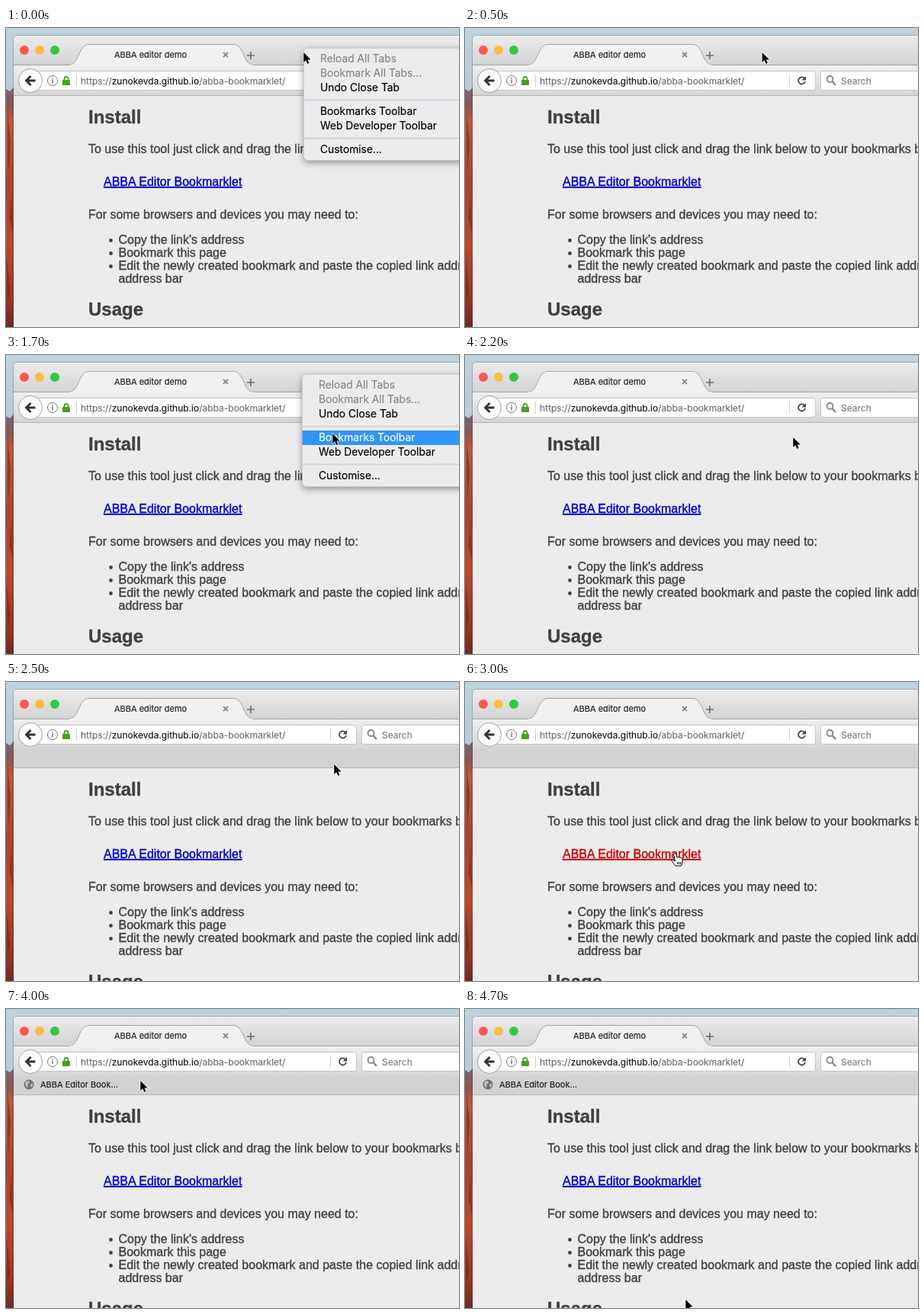
Write an HTML page that moves like this. It is 594 px wide and 392 px high and loops after 4800 ms.

```html
<!DOCTYPE html>
<html lang="en">
<head>
<meta charset="utf-8">
<title>Bookmarklet install demo</title>
<style>
  html, body { margin: 0; width: 100%; height: 100%; overflow: hidden; }
  svg { display: block; font-family: Inter, Roboto, sans-serif; }
  text { white-space: pre; fill: currentColor; stroke: currentColor; stroke-width: .15; }
  #page, #ghost { font: 16px "Liberation Sans", Arial, sans-serif; color: #404040; }
  #page text { stroke-width: .35; }
  #page .head { font-size: 24px; font-weight: bold; }
  #ghost { color: #f00; opacity: .62; }
  .link { text-decoration: underline; }
  #menu { font-size: 13.8px; filter: drop-shadow(0 3px 4px rgba(0, 0, 0, .38)); }
  .line { fill: none; stroke-width: 1; }
</style>
</head>
<body>
<svg width="594" height="392" viewBox="0 0 594 392">
  <defs>
    <linearGradient id="sky" x2="0" y2="1"><stop stop-color="#bfd3df"/><stop offset="1" stop-color="#b9cad8"/></linearGradient>
    <linearGradient id="rock" x2="0" y2="1">
      <stop stop-color="#77667a"/><stop offset=".08" stop-color="#8a5750"/><stop offset=".14" stop-color="#bd5a3c"/>
      <stop offset=".4" stop-color="#a8432b"/><stop offset=".65" stop-color="#b74a2e"/>
      <stop offset=".88" stop-color="#9c3524"/><stop offset="1" stop-color="#6d2c24"/>
    </linearGradient>
    <linearGradient id="titlebar" x2="0" y2="1"><stop stop-color="#ececec"/><stop offset="1" stop-color="#d3d3d3"/></linearGradient>
    <linearGradient id="navbar" x2="0" y2="1"><stop stop-color="#f0f0f0"/><stop offset="1" stop-color="#d5d5d5"/></linearGradient>
    <clipPath id="window"><path d="M10 400V15Q10 10 15 10H600V400Z"/></clipPath>
  </defs>

  <rect width="594" height="84" fill="url(#sky)"/>
  <path d="M0 80L5 83L10 78V392H0Z" fill="url(#rock)"/>
  <path d="M2 110L6 150L3 190ZM7 215L9 270L5 250ZM1 300L5 345L2 360Z" fill="#5d281f" opacity=".6"/>
  <path d="M9.5 392V15Q9.5 9.5 15 9.5H594" class="line" stroke="#000" opacity=".2"/>

  <g clip-path="url(#window)">
    <rect x="10" y="10" width="584" height="382" fill="#ececec"/>
    <g id="page">
      <text class="head" x="108" y="125">Install</text>
      <text x="108" y="164">To use this tool just click and drag the link below to your bookmarks bar</text>
      <text id="link" class="link" x="128" y="207">ABBA Editor Bookmarklet</text>
      <text x="108" y="250">For some browsers and devices you may need to:</text>
      <text x="147.5" y="283">Copy the link's address</text>
      <text x="147.5" y="300">Bookmark this page</text>
      <text x="147.5" y="317">Edit the newly created bookmark and paste the copied link address in the</text>
      <text x="147.5" y="334">address bar</text>
      <path d="M137.500 278.500v0M137.500 295.500v0M137.500 312.500v0" stroke="#404040" stroke-width="4.800" stroke-linecap="round"/>
      <text class="head" x="108" y="377">Usage</text>
    </g>

    <rect id="shelf" x="10" y="88" width="584" fill="#d2d2d2"/>
    <path id="shelfEdge" d="M10 88.500H594" class="line" stroke="#b4b4b4"/>
    <g id="bookmark">
      <circle cx="30" cy="99" r="6.500" fill="#707070"/>
      <path d="M26 95l4-1 1 3-3 2 1 3-2 1-2-4zM32 99l3-2v4l-2 2z" fill="#bdbdbd"/>
      <text x="45" y="103" font-size="11" color="#1c1c1c">ABBA Editor Book…</text>
    </g>

    <rect x="10" y="10" width="584" height="39" fill="url(#titlebar)"/>
    <path d="M10 10.500H594" class="line" stroke="#f3f3f3"/>
    <rect x="10" y="48" width="584" height="40" fill="url(#navbar)"/>
    <path d="M10 48.500H82C97 48.500 94 21.500 109 21.500H298C313 21.500 310 48.500 325 48.500H594" fill="#f1f1f1" stroke="#a2a2a2"/>
    <path d="M84 49H323" stroke="#f0f0f0" stroke-width="2"/>
    <circle cx="24" cy="29" r="6" fill="#fc5753"/>
    <circle cx="44" cy="29" r="6" fill="#fdbc40"/>
    <circle cx="64" cy="29" r="6" fill="#33c748"/>
    <text x="142" y="39" font-size="11" color="#1c1c1c">ABBA editor demo</text>
    <path d="M285 32l6 6m0-6l-6 6" stroke="#8b8b8b" stroke-width="1.800"/>
    <path d="M316 36h10m-5-5v10" stroke="#6b6b6b" stroke-width="1.600"/>

    <rect x="38.500" y="56.500" width="421" height="25" rx="3" fill="#fff" stroke="#c4c4c4"/>
    <rect x="466.500" y="56.500" width="140" height="25" rx="3" fill="#fff" stroke="#c4c4c4"/>
    <circle cx="32" cy="69" r="15.500" fill="#fcfcfc" stroke="#a3a3a3"/>
    <path d="M38.500 69H27m5.500-6l-6 6 6 6" fill="none" stroke="#333" stroke-width="2.800"/>
    <circle cx="61" cy="69" r="6.500" class="line" stroke="#777"/>
    <path d="M61 67.500v5M61 65v1.500" stroke="#777" stroke-width="1.500"/>
    <path d="M76.500 69v-2.500a2.500 2.500 0 0 1 5 0V69" fill="none" stroke="#4a9e25" stroke-width="1.800"/>
    <rect x="74" y="68" width="10" height="7" rx="1" fill="#4a9e25"/>
    <path d="M92.500 61v16M425.500 61v16" stroke="#d0d0d0"/>
    <text x="98" y="74" font-size="12" color="#6c6c6c">https://<tspan color="#111">zunokevda.github.io</tspan>/abba-bookmarklet/</text>
    <path d="M445 66a4.500 4.500 0 1 0 1 4" fill="none" stroke="#444" stroke-width="1.800"/>
    <path d="M447 63v5.500h-5.500z" fill="#444"/>
    <circle cx="478.500" cy="67" r="4" fill="none" stroke="#858585" stroke-width="1.800"/>
    <path d="M481.500 70l4.500 5" stroke="#858585" stroke-width="2.200"/>
    <text x="493" y="74" font-size="12" color="#7c7c7c">Search</text>
  </g>

  <g id="menu">
    <rect width="230" height="147" rx="5" fill="#ececef" stroke="#c6c6c8" stroke-width=".6"/>
    <path d="M0 68H230M0 118H230" stroke="#d4d4d7" stroke-width="2"/>
    <rect id="highlight" width="230" height="19" fill="#3095f5"/>
  </g>

  <text id="ghost" class="link">ABBA Editor Bookmarklet</text>
  <g id="cursor" stroke-linejoin="round">
    <path id="arrow" transform="translate(.3 1) scale(.9)" d="M0 0V14.500L3.300 11.400L5.600 16.600L8 15.600L5.800 10.500H10.400Z" fill="#000" stroke="#fff" stroke-width="1.600" paint-order="stroke"/>
    <path id="hand" d="M-2.500 1.500Q-1.500-1 .5 1L2.200 6Q3 4.500 4.500 6Q6 5 7 6.500Q9 6 9 8.500V12L7.500 17H0L-5 10.500Q-5 8.500-3 9L-.5 11ZM2.500 12v3M4.500 12v3M6.500 12v3" fill="#fff" stroke="#000"/>
  </g>
</svg>
<script>
  const LOOP = 4800, STEP = 100;
  const el = id => document.getElementById(id);
  const move = (id, x, y) => el(id).setAttribute("transform", `translate(${x} ${y})`);
  const show = (id, on) => { el(id).style.display = on ? "" : "none"; };

  // Tracks hold [time, value, ...] and are linear between keys.
  const path = [
    [0, 390, 31], [400, 390, 31], [700, 388, 31], [1000, 388, 31], [1500, 427, 99],
    [1600, 428, 102], [2000, 428, 102], [2200, 430, 107], [2500, 430, 107],
    [2900, 276, 224], [3200, 276, 224], [3500, 178, 101], [3800, 176, 93],
    [4400, 176, 93], [4700, 289, 380]
  ];
  const menuFade = [[200, 1], [500, 0], [800, 0], [900, 1], [2000, 1], [2200, 0]];
  const shelfHeight = [[2200, 0], [2400, 24]];

  function sample(track, t) {
    const next = track.findIndex(key => key[0] > t);
    if (next < 0) return track[track.length - 1].slice(1);
    if (next === 0) return track[0].slice(1);
    const a = track[next - 1], b = track[next];
    const k = (t - a[0]) / (b[0] - a[0]);
    return a.slice(1).map((v, i) => v + (b[i + 1] - v) * k);
  }

  const rows = [
    { label: "Reload All Tabs", y: 14, disabled: true },
    { label: "Bookmark All Tabs...", y: 33, disabled: true },
    { label: "Undo Close Tab", y: 52 },
    { label: "Bookmarks Toolbar", y: 83 },
    { label: "Web Developer Toolbar", y: 102 },
    { label: "Customise...", y: 133 }
  ];
  for (const row of rows) {
    row.text = document.createElementNS("http://www.w3.org/2000/svg", "text");
    row.text.textContent = row.label;
    row.text.setAttribute("x", 21.5);
    row.text.setAttribute("y", row.y + 4.5);
    el("menu").append(row.text);
  }

  function drawMenu(t, cursorY) {
    const [x, y] = t < 800 ? [390.5, 26.5] : [388.5, 25.5];
    const [opacity] = sample(menuFade, t);
    const blink = t === 1900;
    const active = t < 800 || blink ? null
      : rows.find(r => !r.disabled && Math.abs(cursorY - y - r.y) <= 9.5);
    move("menu", x, y);
    el("menu").style.opacity = opacity;
    show("menu", opacity > 0);
    show("highlight", active);
    if (active) el("highlight").setAttribute("y", active.y - 9.5);
    for (const row of rows)
      row.text.setAttribute("color", row === active ? "#fff" : row.disabled ? "#868688" : "#000");
  }

  function draw(t) {
    const [x, y] = sample(path, t);
    const [height] = sample(shelfHeight, t);
    const onLink = t >= 2900 && t < 3900;

    move("page", 0, height);
    el("shelf").setAttribute("height", height);
    move("shelfEdge", 0, height);
    show("bookmark", t >= 3900);
    el("link").setAttribute("color", t >= 2900 && t < 4000 ? "#c00" : "#00c");

    drawMenu(t, y);
    move("ghost", x - 148, y + 9.5);
    show("ghost", t >= 3300 && t < 3900);
    move("cursor", x, y);
    show("arrow", !onLink);
    show("hand", onLink);
  }

  function tick() {
    draw(Math.floor(performance.now() % LOOP / STEP) * STEP);
    requestAnimationFrame(tick);
  }
  tick();
</script>
</body>
</html>
```
